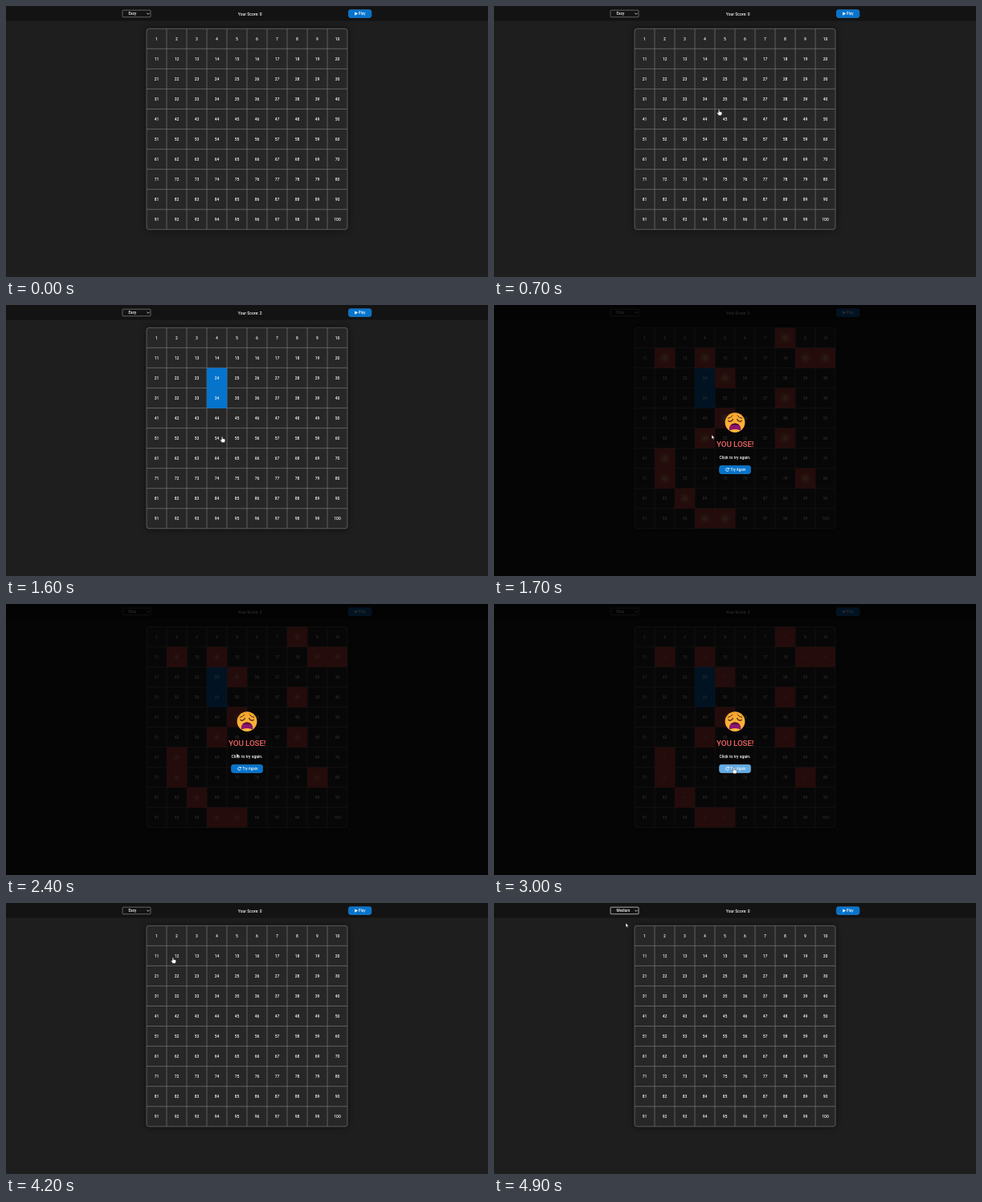
Animation, 600 px wide and 338 px high, one loop 5000 ms. Source, as an HTML page:

```html
<!DOCTYPE html>
<html lang="en">
<head>
<meta charset="utf-8">
<title>Number board game</title>
<style>
  html, body { margin: 0; width: 100%; height: 100%; overflow: hidden; background: #1e1e1e; }
  svg { display: block; width: 600px; height: 338px; }
  text { font-family: Roboto, "Open Sans", sans-serif; font-weight: 500; font-size: 5px; fill: #f2f2f2; }
  .mid { text-anchor: middle; }
</style>
</head>
<body>
<svg viewBox="0 0 600 338" xmlns="http://www.w3.org/2000/svg">
  <defs>
    <filter id="shade" x="-10%" y="-10%" width="120%" height="120%"><feGaussianBlur stdDeviation="4"/></filter>
    <radialGradient id="blast">
      <stop offset="0" stop-color="#ffd0a0"/>
      <stop offset=".45" stop-color="#f08a60" stop-opacity=".8"/>
      <stop offset="1" stop-color="#e05050" stop-opacity="0"/>
    </radialGradient>
    <linearGradient id="skin" x2="0" y2="1">
      <stop offset="0" stop-color="#f9a52c"/>
      <stop offset="1" stop-color="#fdb93c"/>
    </linearGradient>
    <clipPath id="round"><rect x="175" y="28.3" width="250" height="250.5" rx="3"/></clipPath>
  </defs>

  <rect width="600" height="338" fill="#1e1e1e"/>
  <rect width="600" height="18.5" fill="#131314"/>

  <rect id="select" x="145" y="5.2" width="35" height="8.6" rx="1" fill="#131314" stroke-width=".7"/>
  <text id="level" x="152.5" y="11.2" font-size="4.6" style="font-size:4.6px"></text>
  <path d="M175.4 8.8l1.6 1.6 1.6-1.6" fill="none" stroke="#eee" stroke-width=".8"/>
  <text id="score" x="288.8" y="11.6"></text>
  <rect x="426.4" y="4.7" width="28.4" height="9.8" rx="2.4" fill="#0574cd" stroke="#2b8bdb" stroke-width=".6"/>
  <path d="M434.2 7.4l3.8 2.2-3.8 2.2z" fill="#fff"/>
  <text x="438.8" y="11.3" style="font-size:4.5px">Play</text>

  <rect x="175" y="28" width="250" height="251" rx="3" fill="#000" opacity=".6" filter="url(#shade)"/>
  <g clip-path="url(#round)">
    <rect x="175" y="28" width="250" height="251" fill="#272727"/>
    <path id="lines" stroke="#777" stroke-width=".7"/>
    <g id="picked" fill="#0574cd"></g>
    <g id="numbers" class="mid"></g>
    <g id="bombs"></g>
  </g>
  <rect x="175" y="28.3" width="250" height="250.5" rx="3" fill="none" stroke="#777" stroke-width=".7"/>

  <g id="lose">
    <rect width="600" height="338" fill="#000" opacity=".83"/>
    <circle cx="300" cy="146.6" r="12.4" fill="url(#skin)"/>
    <g fill="none" stroke="#4a2b20" stroke-linecap="round">
      <path d="M291.3 141.4q4-.6 5.7-3.5M308.7 141.4q-4-.6-5.7-3.5" stroke-width="1"/>
      <path d="M291.8 144.4q3 2.4 5.6-1.8M308.2 144.4q-3 2.4-5.6-1.8" stroke-width="1.3"/>
    </g>
    <path d="M292.6 155.4q.4-7.8 7.4-7.8t7.4 7.8q-.3 1.4-1.8.7-5.6-2-11.2 0-1.5.7-1.8-.7z" fill="#8c1470"/>
    <path d="M294.7 150.5q2-2.9 5.3-2.9t5.3 2.9q-5.3-1.4-10.6 0z" fill="#4c1238"/>
    <text class="mid" x="300.2" y="176.6" style="font-size:9.8px;fill:#f56565;letter-spacing:-.1px">YOU LOSE!</text>
    <text class="mid" x="300" y="192.2">Click to try again.</text>
    <rect id="again" x="280.6" y="200.4" width="38.8" height="10" rx="2.4" stroke-width=".6"/>
    <path d="M291.9 204.2a1.9 1.9 0 1 0 .4 1.8" fill="none" stroke="#fff" stroke-width=".8"/>
    <path d="M292.7 202.8v2.2h-2.2z" fill="#fff"/>
    <text x="294.3" y="207.1" style="font-size:4.5px">Try Again</text>
  </g>

  <g id="cursor" fill="#fff" stroke="#111" stroke-width=".4" stroke-linejoin="round">
    <path id="arrow" d="M0 0v5l1.2-1 .8 1.8.9-.4-.8-1.7h1.6z"/>
    <path id="hand" d="M-.7.6q.7-1 1.4 0v2l2.4.6q.9.3.8 1.2l-.5 2.4q-.1.6-.8.6H.1q-.5 0-.8-.5L-2.5 4.3q.3-1 1.2-.4l.6.5z"/>
  </g>
</svg>
<script>
const NS = "http://www.w3.org/2000/svg";
const $ = id => document.getElementById(id);
const LEFT = 175, TOP = 28.3, W = 25, H = 25.05, LOOP = 5000;
const BOMBS = [8, 12, 14, 19, 20, 25, 38, 45, 54, 58, 62, 72, 79, 83, 94, 95];

// time, x, y of the pointer tip
const PATH = [
  [700, 280, 129], [900, 264, 93], [1000, 264.5, 111.5], [1200, 267, 133],
  [1500, 269, 163], [1600, 269, 164], [1700, 271, 162], [1900, 271, 162],
  [2800, 298.5, 204], [3400, 298.5, 204], [3500, 296, 197], [3700, 296, 197],
  [4500, 167, 8], [4700, 166, 9], [4900, 164, 25]
];

function add(parent, tag, attrs) {
  const el = document.createElementNS(NS, tag);
  for (const k in attrs) el.setAttribute(k, attrs[k]);
  return parent.appendChild(el);
}

const corner = n => [LEFT + (n - 1) % 10 * W, TOP + Math.floor((n - 1) / 10) * H];

function cell(parent, n, attrs) {
  const [x, y] = corner(n);
  return add(parent, "rect", { x, y, width: W + .3, height: H + .3, ...attrs });
}

let d = "";
for (let i = 1; i < 10; i++) d += `M${LEFT + i * W} 28v251M175 ${TOP + i * H}h250`;
$("lines").setAttribute("d", d);

for (let n = 1; n <= 100; n++) {
  const [x, y] = corner(n);
  add($("numbers"), "text", { x: x + W / 2, y: y + 14.7 }).textContent = n;
}

const picks = [[24, 900], [34, 1200]].map(([n, at]) => ({ at, el: cell($("picked"), n, {}) }));

const blasts = BOMBS.map(n => {
  const [x, y] = corner(n);
  cell($("bombs"), n, { fill: "#d24a44" });
  return add($("bombs"), "circle", { cx: x + W / 2, cy: y + H / 2, fill: "url(#blast)" });
});

const show = (el, on) => el.setAttribute("visibility", on ? "visible" : "hidden");

function pointer(t) {
  const i = PATH.findIndex(p => p[0] > t);
  if (i < 0) return PATH[PATH.length - 1].slice(1);
  if (i === 0) return PATH[0].slice(1);
  const [t0, x0, y0] = PATH[i - 1], [t1, x1, y1] = PATH[i];
  const u = (t - t0) / (t1 - t0), e = u * u * (3 - 2 * u);
  return [x0 + (x1 - x0) * e, y0 + (y1 - y0) * e];
}

function draw(ms) {
  const t = Math.floor(ms / 100) * 100;
  const lost = t >= 1700 && t < 3500;
  const inRound = t < 3500;
  const hits = inRound ? picks.filter(p => t >= p.at).length : 0;

  $("score").textContent = "Your Score: " + hits;
  for (const p of picks) show(p.el, inRound && t >= p.at);
  show($("lose"), lost);
  show($("bombs"), lost);

  const fade = Math.min(1, Math.max(0, (t - 1700) / 1200));
  for (const b of blasts) {
    b.setAttribute("r", 8.5 - 5.5 * fade);
    b.setAttribute("opacity", .85 - .4 * fade);
  }

  const [x, y] = pointer(t);
  const onButton = lost && x > 280.6 && x < 319.4 && y > 200.4 && y < 210.4;
  const onBoard = !lost && x > 175 && x < 425 && y > 28 && y < 279;
  $("again").setAttribute("fill", onButton ? "#63ace6" : "#0574cd");
  $("again").setAttribute("stroke", onButton ? "#8cc4ef" : "#2b8bdb");

  const seen = t >= 700, hand = onButton || onBoard;
  $("cursor").setAttribute("transform", `translate(${x} ${y})`);
  show($("hand"), seen && hand);
  show($("arrow"), seen && !hand);

  $("level").textContent = t >= 4900 ? "Medium" : "Easy";
  $("select").setAttribute("stroke", t >= 4700 ? "#e8e8e8" : "#858585");
}

const start = performance.now();
function tick() {
  draw((performance.now() - start) % LOOP);
  requestAnimationFrame(tick);
}
tick();
</script>
</body>
</html>
```
